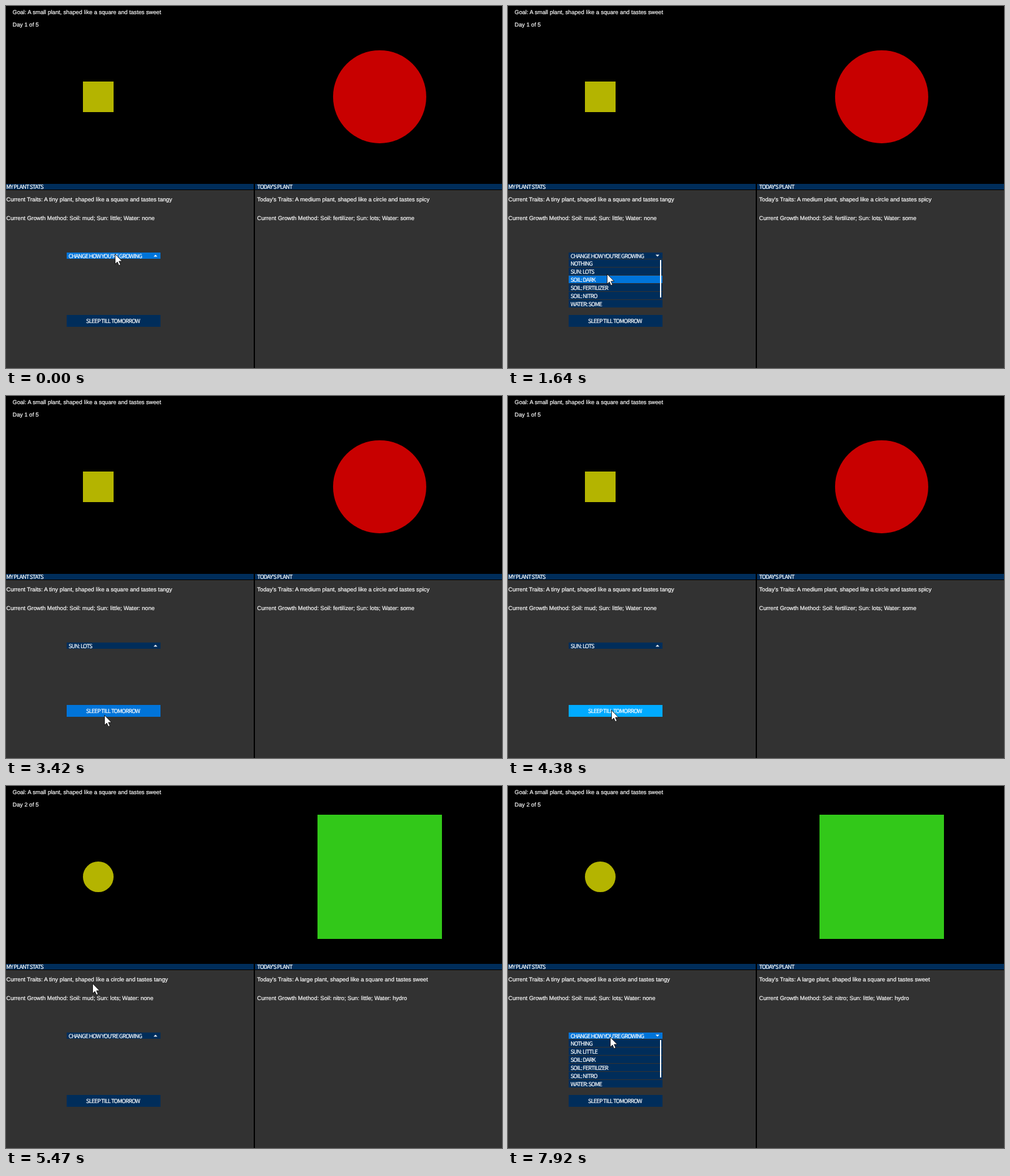
Write an HTML page that moves like this. It is 793 by 580 pixels and loops after 8000 ms.

```html
<!DOCTYPE html>
<html lang="en">
<head>
<meta charset="utf-8">
<title>Plant game</title>
<style>
  :root { --navy: #002d5a; --hover: #0074d9; --press: #00aaff; }
  html, body { margin: 0; width: 100%; height: 100%; overflow: hidden; background: #000; }
  svg { display: block; width: 793px; height: 580px; }
  text {
    font: 9.2px "Liberation Sans", Arial, sans-serif;
    fill: #fff;
    stroke: #fff;
    stroke-width: .2px;
    text-rendering: geometricPrecision;
    white-space: pre;
  }
  .ui text {
    font: 9px "Noto Sans CJK JP", "Liberation Sans", sans-serif;
    letter-spacing: -.75px;
  }
  .panel { fill: #323232; }
  .navy { fill: var(--navy); }
  .white { fill: #fff; }

  .day1, .day2, .list, .closed, .prompt, .choice, .bar, .button, .row, .cursor {
    animation: 8s step-end infinite;
  }
  .day1 { animation-name: day1; }
  .day2 { animation-name: day2; }
  .list { animation-name: list; }
  .closed { animation-name: closed; }
  .prompt { animation-name: prompt; }
  .choice { animation-name: choice; }
  .bar { animation-name: bar; }
  .button { animation-name: button; }
  .row { animation-name: row; }
  .cursor { animation-name: cursor; }

  @keyframes day1 { 0% { opacity: 1 } 56.5%, 100% { opacity: 0 } }
  @keyframes day2 { 0% { opacity: 0 } 56.5%, 100% { opacity: 1 } }
  @keyframes list {
    0%, 29% { opacity: 0 }
    7%, 80.25%, 100% { opacity: 1 }
  }
  @keyframes closed {
    0%, 29% { opacity: 1 }
    7%, 80.25%, 100% { opacity: 0 }
  }
  @keyframes prompt {
    0%, 56.5%, 100% { opacity: 1 }
    29% { opacity: 0 }
  }
  @keyframes choice {
    0%, 56.5%, 100% { opacity: 0 }
    29% { opacity: 1 }
  }
  @keyframes bar {
    0%, 76.75%, 100% { fill: var(--hover) }
    15.5% { fill: var(--navy) }
  }
  @keyframes button {
    0%, 44.375%, 65%, 100% { fill: var(--navy) }
    42.75%, 47.625%, 56.5% { fill: var(--hover) }
    54.75% { fill: var(--press) }
  }
  @keyframes row {
    0% { opacity: 0; fill: var(--hover); transform: translateY(0) }
    15.5% { opacity: 1; fill: var(--hover); transform: translateY(13px) }
    17.125% { opacity: 1; fill: var(--hover); transform: translateY(26px) }
    22.375% { opacity: 1; fill: var(--hover); transform: translateY(13px) }
    27.5% { opacity: 1; fill: var(--press); transform: translateY(13px) }
    29%, 100% { opacity: 0; fill: var(--hover); transform: translateY(0) }
  }
  @keyframes cursor {
    0% { transform: translate(174px, 397px) }
    13.75% { transform: translate(164px, 411px) }
    15.5% { transform: translate(160px, 422px) }
    17.125% { transform: translate(158px, 431px) }
    20.5% { transform: translate(158px, 429px) }
    22.375% { transform: translate(160px, 426px) }
    41% { transform: translate(155px, 483px) }
    42.75% { transform: translate(157px, 511px) }
    44.375% { transform: translate(160px, 515px) }
    45.875% { transform: translate(162px, 514px) }
    47.625% { transform: translate(165px, 503px) }
    63.125% { transform: translate(166px, 501px) }
    65% { transform: translate(169px, 468px) }
    66.625% { transform: translate(171px, 429px) }
    68.375% { transform: translate(138px, 316px) }
    70% { transform: translate(152px, 360px) }
    71.625% { transform: translate(161px, 387px) }
    73.375% { transform: translate(161px, 395px) }
    75% { transform: translate(162px, 398px) }
    76.75% { transform: translate(163px, 399px) }
    99%, 100% { transform: translate(163px, 402px) }
  }
</style>
</head>
<body>
<svg viewBox="0 0 793 580" xmlns="http://www.w3.org/2000/svg">
  <rect width="793" height="580"/>
  <rect class="panel" y="295" width="396" height="285"/>
  <rect class="panel" x="398" y="295" width="395" height="285"/>
  <rect class="navy" y="285" width="396" height="9"/>
  <rect class="navy" x="398" y="285" width="395" height="9"/>

  <text x="10.5" y="13">Goal: A small plant, shaped like a square and tastes sweet</text>

  <g class="day1">
    <rect x="123" y="121" width="49" height="49" fill="#b4b400"/>
    <circle cx="597.4" cy="145.4" r="74.5" fill="#c80000"/>
    <text x="10.5" y="33">Day 1 of 5</text>
    <text x=".5" y="313">Current Traits: A tiny plant, shaped like a square and tastes tangy</text>
    <text x=".5" y="343">Current Growth Method: Soil: mud; Sun: little; Water: none</text>
    <text x="401.5" y="313">Today's Traits: A medium plant, shaped like a circle and tastes spicy</text>
    <text x="401.5" y="343">Current Growth Method: Soil: fertilizer; Sun: lots; Water: some</text>
  </g>

  <g class="day2">
    <circle cx="147.5" cy="145.5" r="24.5" fill="#b4b400"/>
    <rect x="498" y="46" width="199" height="199" fill="#32c819"/>
    <text x="10.5" y="33">Day 2 of 5</text>
    <text x=".5" y="313">Current Traits: A tiny plant, shaped like a circle and tastes tangy</text>
    <text x=".5" y="343">Current Growth Method: Soil: mud; Sun: lots; Water: none</text>
    <text x="401.5" y="313">Today's Traits: A large plant, shaped like a square and tastes sweet</text>
    <text x="401.5" y="343">Current Growth Method: Soil: nitro; Sun: little; Water: hydro</text>
  </g>

  <g class="ui">
    <text x=".5" y="293">MY PLANT STATS</text>
    <text x="401.5" y="293">TODAY'S PLANT</text>

    <rect class="bar" x="97" y="395" width="150" height="10"/>
    <text class="prompt" x="100" y="404">CHANGE HOW YOU'RE GROWING</text>
    <text class="choice" x="100" y="404">SUN: LOTS</text>
    <path class="closed white" d="M236 401.5h6l-3-3z"/>

    <g class="list">
      <path class="white" d="M236 398.5h6l-3 3z"/>
      <path class="navy" d="M97 406h150v12h-150zm0 13h150v12h-150zm0 13h150v12h-150zm0 13h150v12h-150zm0 13h150v12h-150zm0 13h150v12h-150z"/>
      <rect class="row" x="97" y="406" width="150" height="12"/>
      <rect class="white" x="243" y="407" width="2" height="60"/>
      <text x="100" y="416">NOTHING</text>
      <text class="day1" x="100" y="429">SUN: LOTS</text>
      <text class="day2" x="100" y="429">SUN: LITTLE</text>
      <text x="100" y="442">SOIL: DARK</text>
      <text x="100" y="455">SOIL: FERTILIZER</text>
      <text x="100" y="468">SOIL: NITRO</text>
      <text x="100" y="481">WATER: SOME</text>
    </g>

    <rect class="button" x="97" y="495" width="150" height="19"/>
    <text x="171" y="508" text-anchor="middle">SLEEP TILL TOMORROW</text>
  </g>

  <path class="cursor" fill="#fff" stroke="#000" stroke-width=".8"
    d="M.5 .5v16l3.6-3.4 2.5 5.6 2.6-1.1-2.5-5.6h5z"/>
</svg>
</body>
</html>
```
